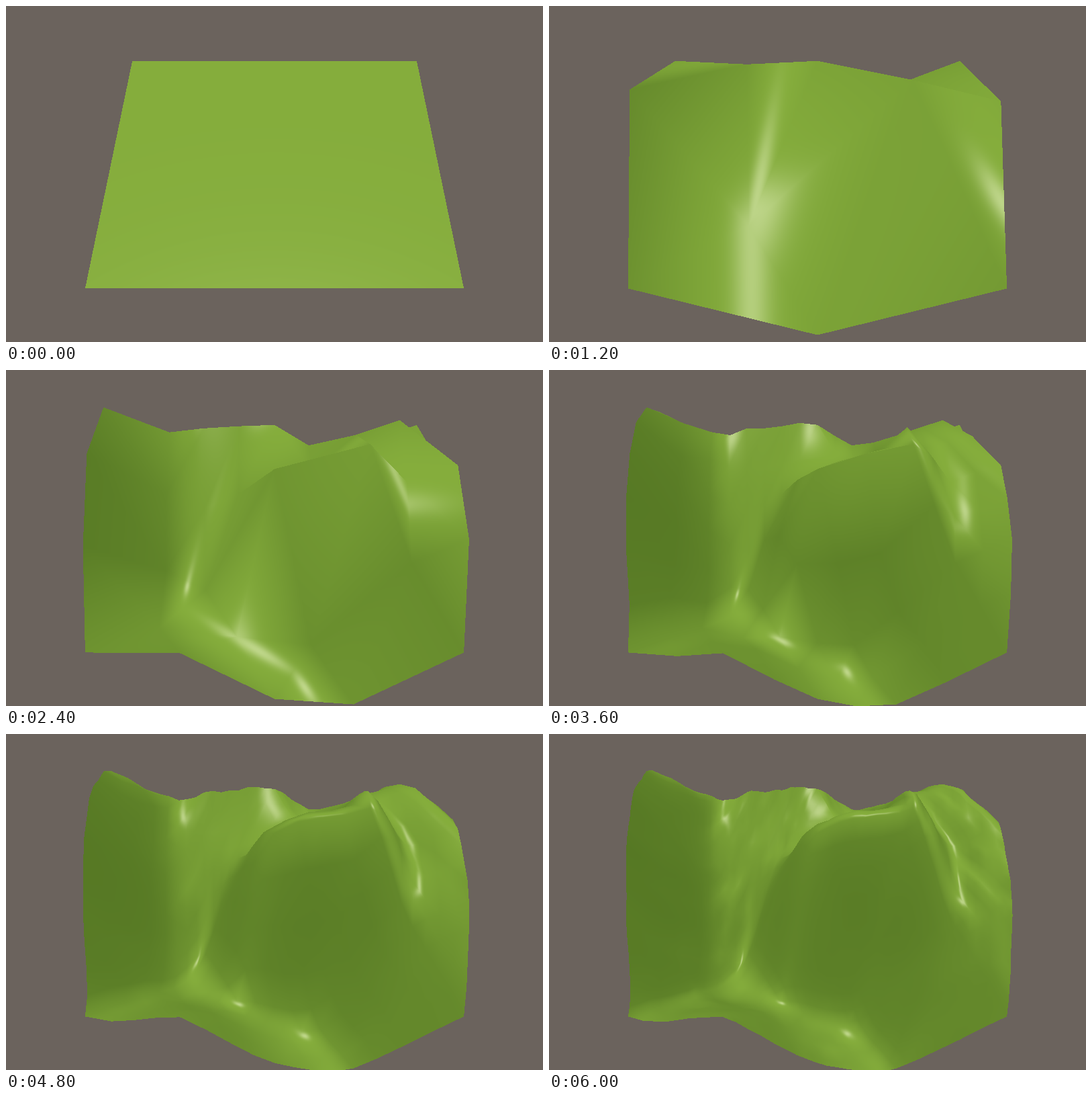
These frames come from a looping animation (800 px wide and 500 px high, 7.2 s). An HTML page with a canvas:

```html
<!DOCTYPE html>
<html lang="en">
<head>
<meta charset="utf-8">
<title>Terrain subdivision</title>
<style>
html, body { margin: 0; width: 100%; height: 100%; overflow: hidden; background: #6b635d; }
canvas { display: block; width: 100vw; height: 100vh; }
</style>
</head>
<body>
<canvas id="stage" width="800" height="500"></canvas>
<script>
const W = 800, H = 500, STEP = 1200, LEVELS = 6;
const DEPTH = Math.sqrt(3) / 2;
const FOCAL = 870, PITCH = 0.9394;
const COS = Math.cos(PITCH), SIN = Math.sin(PITCH);

// Key heights, back row to front row; finer detail grows from these
const KEY_ROWS = [
  [0, -.035, -.016, -.006, 0, -.1, -.14, -.06, 0],
  [.27, -.12, -.2, -.12, 0, .16, .22, .09],
  [.3, -.27, -.4, .24, .335, .185, .255],
  [.18, -.28, -.34, -.4, .1, .21],
  [0, -.004, -.333, -.379, 0]
];

const key = (x, t) => x + ',' + t;

// The middle triangle has columns twice as wide as the side triangles
const keyHeights = new Map();
KEY_ROWS.forEach((row, j) => {
  const t = j / 4;
  let x = -.5;
  for (const h of row) {
    keyHeights.set(key(x, t), h);
    x += x >= -t / 2 && x < t / 2 ? .25 : .125;
  }
});

let seed = 7;
const random = () => (seed = (seed * 16807) % 2147483647) / 2147483647;

const vertex = (x, t, h) => ({ x, t, h, z: (t - .5) * DEPTH, n: [0, 1, 0] });

// Smooth normals, weighted by triangle area
function setNormals({ verts, tris }) {
  for (const v of verts) v.n = [0, 0, 0];
  for (const tri of tris) {
    const [a, b, c] = tri;
    const ux = b.x - a.x, uh = b.h - a.h, uz = b.z - a.z;
    const vx = c.x - a.x, vh = c.h - a.h, vz = c.z - a.z;
    const n = [uh * vz - uz * vh, uz * vx - ux * vz, ux * vh - uh * vx];
    const sign = Math.sign(n[1]);
    for (const v of tri) n.forEach((k, i) => v.n[i] += sign * k);
  }
  for (const v of verts) {
    const len = Math.hypot(...v.n);
    v.n = v.n.map(k => k / len);
  }
}

// Height halfway along an edge, following the slopes at both ends
function midHeight(a, b, level) {
  const slope = (v, i) => -v.n[i] / v.n[1];
  const bend = (slope(a, 0) - slope(b, 0)) * (b.x - a.x) + (slope(a, 2) - slope(b, 2)) * (b.z - a.z);
  return (a.h + b.h) / 2 + bend / 8 + (random() - .5) * .24 / 2 ** level;
}

function subdivide(mesh, level) {
  const verts = [...mesh.verts], tris = [], mids = new Map();
  const mid = (a, b) => {
    const x = (a.x + b.x) / 2, t = (a.t + b.t) / 2, k = key(x, t);
    if (!mids.has(k)) {
      const v = vertex(x, t, keyHeights.get(k) ?? midHeight(a, b, level));
      mids.set(k, v);
      verts.push(v);
    }
    return mids.get(k);
  };
  for (const [a, b, c] of mesh.tris) {
    const ab = mid(a, b), bc = mid(b, c), ca = mid(c, a);
    tris.push([a, ab, ca], [ab, b, bc], [ca, bc, c], [ab, bc, ca]);
  }
  return { verts, tris };
}

function project(v) {
  const depth = 1.7975 - COS * v.z - SIN * v.h;
  const drop = -.0475 + SIN * v.z - COS * v.h;
  return { x: W / 2 + FOCAL * v.x / depth, y: H / 2 + FOCAL * drop / depth, w: 1 / depth, n: v.n };
}

// Light from straight above, with a soft highlight
function shade(data, o, px, py, nx, ny, nz) {
  const len = Math.hypot(nx, ny, nz);
  const up = Math.max(0, ny / len);
  const ex = -px, ey = COS * py + SIN * FOCAL, ez = COS * FOCAL - SIN * py;
  const hy = ey + Math.hypot(ex, ey, ez);
  const cos = (nx * ex + ny * hy + nz * ez) / (len * Math.hypot(ex, hy, ez));
  const shine = Math.max(0, cos) ** 78;
  data[o] = 76 + 57 * up + 58 * shine;
  data[o + 1] = 109 + 64 * up + 42 * shine;
  data[o + 2] = 31 + 29 * up + 77 * shine;
}

const cross = (a, b, x, y) => (b.x - a.x) * (y - a.y) - (b.y - a.y) * (x - a.x);

function fillTriangle(image, nearest, a, b, c) {
  const area = cross(a, b, c.x, c.y);
  if (!area) return;
  const x0 = Math.max(0, Math.floor(Math.min(a.x, b.x, c.x)));
  const x1 = Math.min(W - 1, Math.ceil(Math.max(a.x, b.x, c.x)));
  const y0 = Math.max(0, Math.floor(Math.min(a.y, b.y, c.y)));
  const y1 = Math.min(H - 1, Math.ceil(Math.max(a.y, b.y, c.y)));
  for (let y = y0; y <= y1; y++) {
    for (let x = x0; x <= x1; x++) {
      const u = cross(b, c, x + .5, y + .5) / area;
      const v = cross(c, a, x + .5, y + .5) / area;
      const s = 1 - u - v;
      if (u < 0 || v < 0 || s < 0) continue;
      const p = u * a.w, q = v * b.w, r = s * c.w, i = y * W + x;
      if (p + q + r <= nearest[i]) continue;
      nearest[i] = p + q + r;
      const mix = k => p * a.n[k] + q * b.n[k] + r * c.n[k];
      shade(image.data, i * 4, x + .5 - W / 2, y + .5 - H / 2, mix(0), mix(1), mix(2));
    }
  }
}

function render(mesh) {
  const image = new ImageData(W, H);
  new Uint32Array(image.data.buffer).fill(0xff5d636b);
  const nearest = new Float32Array(W * H);
  const points = new Map(mesh.verts.map(v => [v, project(v)]));
  for (const tri of mesh.tris) fillTriangle(image, nearest, ...tri.map(v => points.get(v)));
  return image;
}

function buildImages() {
  const [bl, bm, br, fl, fr] = [[-.5, 0], [0, 0], [.5, 0], [-.5, 1], [.5, 1]].map(([x, t]) => vertex(x, t, 0));
  let mesh = { verts: [bl, bm, br, fl, fr], tris: [[bl, bm, fl], [bm, fl, fr], [bm, br, fr]] };
  const images = [];
  for (let level = 0; level < LEVELS; level++) {
    if (level) mesh = subdivide(mesh, level);
    setNormals(mesh);
    images.push(render(mesh));
  }
  return images;
}

const ctx = document.getElementById('stage').getContext('2d');
const start = performance.now();
const images = buildImages();
let shown = -1;

function update(t) {
  const i = Math.floor(t / STEP) % LEVELS;
  if (i !== shown) ctx.putImageData(images[i], 0, 0);
  shown = i;
}

function tick() {
  update(performance.now() - start);
  requestAnimationFrame(tick);
}
tick();
</script>
</body>
</html>
```
